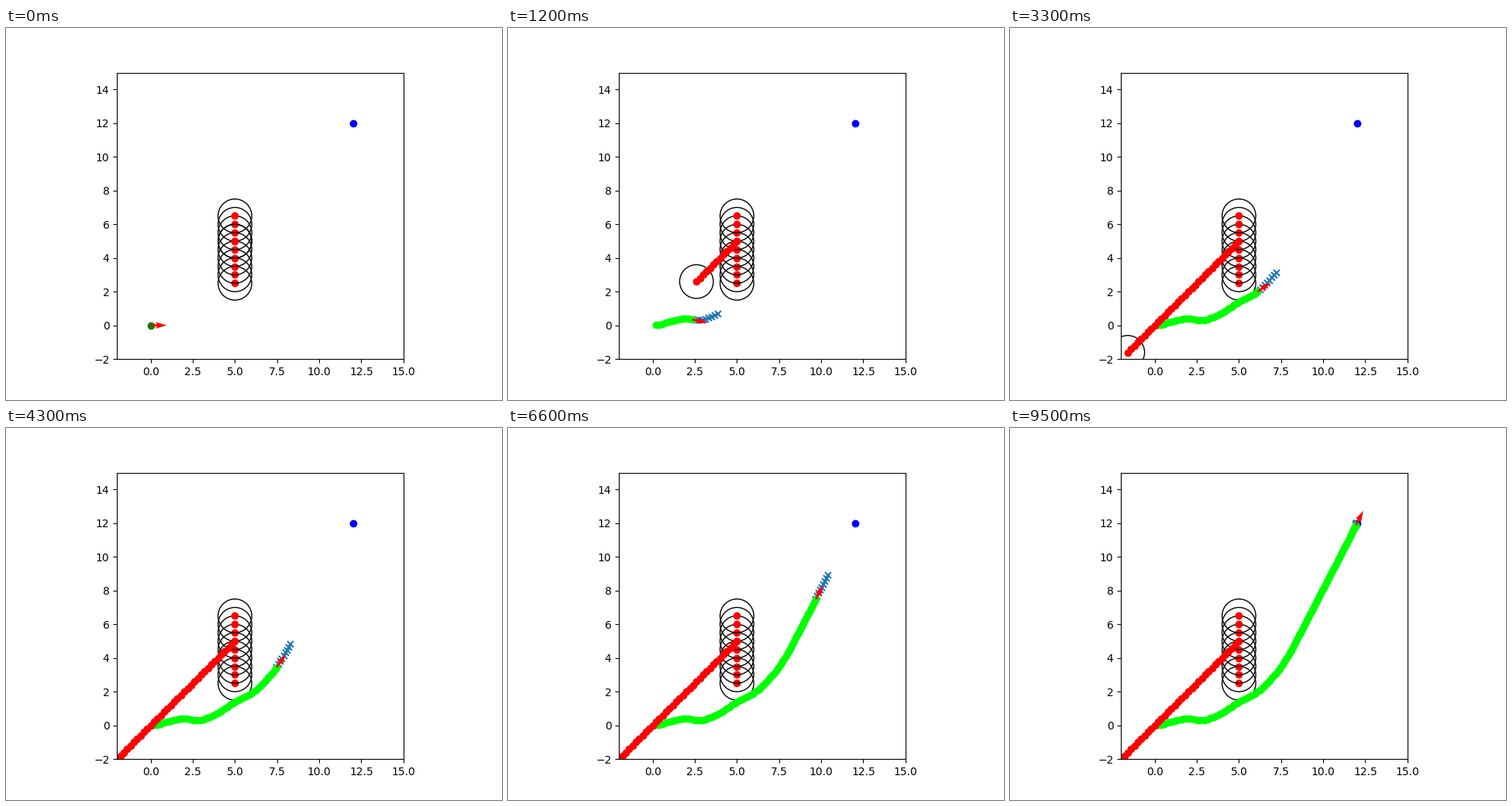
Write a matplotlib script that moves like this. It is 640 px wide and 480 px high and loops after 9600 ms.

```python
import numpy as np
import matplotlib.pyplot as plt
from matplotlib.animation import FuncAnimation

FRAMES = 96
STEP = 0.2          # distance covered per frame
HORIZON = 8         # predicted steps ahead
BRAKING = 0.8       # distance from the goal where the robot slows down
GOAL = (12, 12)
WAYPOINTS = np.array([
    (0, 0), (1.2, 0.27), (1.9, 0.4), (2.8, 0.3), (3.7, 0.58), (5, 1.4),
    (6.2, 2.07), (7.2, 3.1), (8.62, 5.42), (9.3, 6.74), GOAL,
])


def arc_length(points):
    steps = np.hypot(*np.diff(points, axis=0).T)
    return np.concatenate([[0], np.cumsum(steps)])


def smooth(points, samples=60):
    """Cubic Hermite curve through the points, leaving along +x."""
    s = arc_length(points)
    slopes = np.gradient(points, s, axis=0)
    slopes[0] = (1, 0)
    t = np.linspace(0, 1, samples, endpoint=False)[:, None]
    h = t * t * (3 - 2 * t)
    pieces = []
    for i, d in enumerate(np.diff(s)):
        pieces.append((1 - h) * points[i] + h * points[i + 1]
                      + d * t * (1 - t) ** 2 * slopes[i]
                      - d * t * t * (1 - t) * slopes[i + 1])
    return np.vstack(pieces + [points[-1:]])


def travelled(k, total):
    """Constant speed, then an exponential approach to the goal."""
    late = np.maximum(STEP * k - (total - BRAKING), 0)
    braked = total - BRAKING * np.exp(-late / BRAKING)
    return np.where(late > 0, braked, STEP * k)


def sample(values, at, along):
    return np.column_stack([np.interp(at, along, v) for v in values.T])


curve = smooth(WAYPOINTS)
along = arc_length(curve)
distance = travelled(np.arange(FRAMES + HORIZON), along[-1])
robot = sample(curve, distance, along)
tangent = np.gradient(curve, along, axis=0)
heading = sample(tangent, distance, along)
heading /= np.hypot(*heading.T)[:, None]
obstacle = np.repeat(5 - STEP * np.arange(FRAMES), 2).reshape(-1, 2)

fig, ax = plt.subplots(figsize=(6.4, 4.8), dpi=100)
ax.set_aspect("equal")
ax.set_xlim(-2, 15)
ax.set_ylim(-2, 15)


def dots(points, color, marker="o", **style):
    x, y = np.reshape(points, (-1, 2)).T
    return ax.plot(x, y, marker, color=color, **style)[0]


def ring(center):
    return ax.add_patch(plt.Circle(center, 1, fill=False, zorder=2))


# Artists of equal zorder stack in the order they are added.
forecast = dots([], "C0", "x", markeredgewidth=1.5)
for height in np.arange(2.5, 7, 0.5):
    dots((5, height), "red")
    ring((5, height))
moving_ring = ring((5, 5))
dots(GOAL, "blue")
start = dots(robot[0], "green")
trail = dots([], "lime")
obstacle_trail = dots([], "red")
arrow = ax.quiver(0, 0, 1, 0, color="red", scale=18, width=0.0075, zorder=3)


def update(k):
    start.set_visible(k == 0)
    trail.set_data(*robot[1:k + 1].T)
    ahead = robot[k:k + HORIZON + 1] if k else robot[:0]
    forecast.set_data(*ahead.T)
    obstacle_trail.set_data(*obstacle[:k + 1].T)
    moving_ring.center = obstacle[k]
    arrow.set_offsets(robot[k:k + 1])
    arrow.set_UVC(*heading[k])
    return start, trail, forecast, obstacle_trail, moving_ring, arrow


anim = FuncAnimation(fig, update, frames=FRAMES, interval=100, repeat=True)
plt.show()
```
